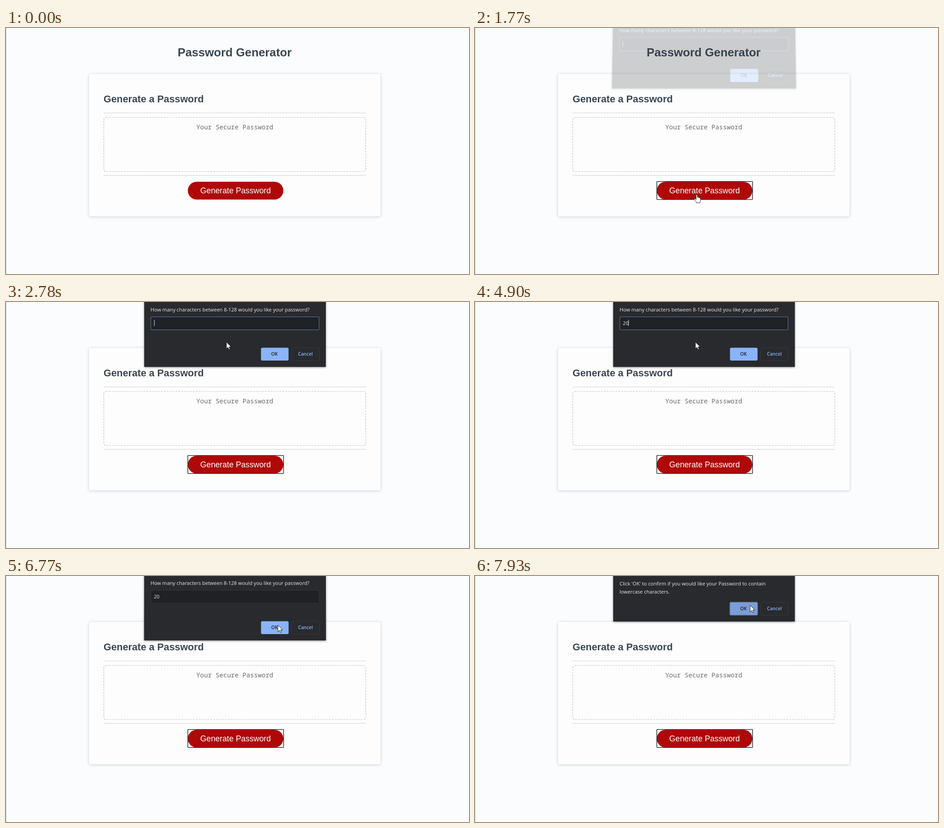
An HTML page for the animation above (8 s loop, 1025 by 546 pixels).

```html
<!DOCTYPE html>
<html lang="en">
<head>
<meta charset="utf-8">
<title>Password Generator</title>
<style>
html, body { margin: 0; width: 100%; height: 100%; overflow: hidden; background: #fafcfe; }
#stage { position: relative; width: 1025px; height: 546px; overflow: hidden; }
svg { position: absolute; left: 0; top: 0; overflow: visible; }
.card { position: absolute; left: 184px; top: 102px; width: 645px; height: 316px; border-radius: 4px;
  background: #fdfdfd; box-shadow: 0 1px 6px rgba(50, 65, 80, .24); }
.page { font-family: "Liberation Sans", Arial, sans-serif; }
.head { font-weight: 700; fill: #3b4752; }
.mono { font: 14.2px "Noto Sans Mono", monospace; fill: #6c6c6c; }
.dialog { position: absolute; left: 306px; top: -40px; width: 401.5px; background: #292a2d;
  box-shadow: 0 1px 4px rgba(0, 0, 0, .5); transform-origin: 201px 0; }
.dialog text { font: 11.08px "Open Sans", "Noto Sans", sans-serif; fill: #e8eaed; }
.dialog .btn { font-size: 10.2px; font-weight: 600; text-anchor: middle; fill: #8ab4f8; }
.dialog .dark { fill: #202124; }
#ask { height: 184px; }
#confirm { height: 141px; }
</style>
</head>
<body>
<div id="stage">
  <div class="card"></div>
  <svg class="page" width="1025" height="546">
    <path d="M.5 0V546" stroke="#cfd1d3"/>
    <text class="head" x="380" y="63" font-size="25.8">Password Generator</text>
    <text class="head" x="216" y="165" font-size="21.8">Generate a Password</text>
    <path d="M216 188.5H797M216 327H797" stroke="#e6e6e7" stroke-width="1.8"/>
    <rect x="216.5" y="198.5" width="580" height="120" rx="5" fill="none" stroke="#c2c2c2" stroke-width="1.2" stroke-dasharray="4 2.4"/>
    <text class="mono" x="506.5" y="225" text-anchor="middle">Your Secure Password</text>
    <rect x="402.5" y="341.3" width="211.5" height="39.4" rx="19.7" fill="#af0808"/>
    <text x="508.2" y="367.3" font-size="17.7" text-anchor="middle" fill="#fff">Generate Password</text>
    <rect id="ring" x="402.5" y="340.6" width="212" height="40" rx="1" fill="none" stroke="#101010" stroke-width="1.3"/>
  </svg>

  <div id="ask" class="dialog">
    <svg width="402" height="184" viewBox="306 -40 402 184">
      <text x="320" y="21.3">How many characters between 8-128 would you like your password?</text>
      <rect id="field" x="320.5" y="33" width="372.5" height="28.8" rx="2.5" fill="#202124"/>
      <text id="typed" x="327.3" y="51"></text>
      <rect id="caret" y="39.5" width="1" height="14" fill="#e8eaed"/>
      <rect id="askOk" x="564.5" y="101.5" width="61" height="28.5" rx="3"/>
      <text class="btn dark" x="594.3" y="119.4">OK</text>
      <rect x="632.5" y="101.5" width="61" height="28.5" rx="3" fill="none" stroke="#37383c"/>
      <text class="btn" x="662.8" y="119.4">Cancel</text>
    </svg>
  </div>

  <div id="confirm" class="dialog">
    <svg width="402" height="141" viewBox="306 -40 402 141">
      <text x="320" y="21.3">Click 'OK' to confirm if you would like your Password to contain</text>
      <text x="320" y="39.3">lowercase characters.</text>
      <rect id="confirmOk" x="564.3" y="58.3" width="61.2" height="28.6" rx="3" stroke="#5f7fb4" stroke-width="1.4"/>
      <text class="btn dark" x="594.3" y="76.4">OK</text>
      <rect x="632.5" y="58.5" width="61" height="28.5" rx="3" fill="none" stroke="#37383c"/>
      <text class="btn" x="662.8" y="76.4">Cancel</text>
    </svg>
  </div>

  <svg width="1025" height="546">
    <g id="cursor" fill="#fff" stroke="#111" stroke-width=".9" stroke-linejoin="round">
      <path id="arrow" d="M0 0V14.6L3.4 11.5L5.6 16.4L7.9 15.4L5.8 10.6H10.3Z"/>
      <path id="hand" d="M-1.5 1.2C-1.5-.7 1.3-.7 1.3 1.2V6C2.2 4.9 3.8 5.3 4 6.6C5 5.8 6.3 6.3 6.5 7.6C7.4 7 8.2 7.8 8.2 9V12.6C8.2 15 7.2 15.6 6.9 18H-.6C-.9 15.6-3.4 13.6-5.2 10.6C-6.2 8.8-4.2 7.8-2.9 9.4L-1.5 11Z"/>
      <path id="beam" d="M-3-7.5H-1L0-6.8L1-7.5H3M0-6.8V6.8M-3 7.5H-1L0 6.8L1 7.5H3" fill="none" stroke="#222"/>
    </g>
  </svg>
</div>
<script>
const LOOP = 8000, TICK = 76, BLINK = 550;
const CLICK = 1670, TYPE = 4820, SUBMIT = 6770, NEXT = SUBMIT + 2 * TICK;

const $ = id => document.getElementById(id);
const show = (id, on) => { $(id).style.visibility = on ? 'visible' : 'hidden'; };
const set = (id, attrs) => Object.entries(attrs).forEach(([k, v]) => $(id).setAttribute(k, v));
const clamp = (v, lo, hi) => Math.max(lo, Math.min(hi, v));
const ticks = ms => Math.floor(ms / TICK);

// Each move carries on from the last one; bow bends its path sideways
const moves = [
  { start: 100, end: 430, x: 709, y: 422, bow: 0 },
  { start: 570, end: 1050, x: 491, y: 370, bow: 0 },
  { start: 2160, end: 2700, x: 488, y: 89, bow: 48 },
  { start: 5980, end: 6690, x: 602, y: 109, bow: 0 },
  { start: 7700, end: 7930, x: 609, y: 65, bow: 0 }
];

function mouseAt(t) {
  let at = null, from = { x: 812, y: 488 };
  for (const m of moves) {
    if (t < m.start) break;
    const p = Math.min(1, (ticks(t - m.start) + 1) / (ticks(m.end - m.start) + 1));
    const e = p * p * (3 - 2 * p);
    at = {
      x: from.x + (m.x - from.x) * e + m.bow * Math.sin(Math.PI * e),
      y: from.y + (m.y - from.y) * e
    };
    from = m;
  }
  return at;
}

const inside = (m, x, y, w, h) => !!m && m.x >= x && m.x <= x + w && m.y >= y && m.y <= y + h;
const tint = over => over ? '#7b9dd8' : '#8ab4f8';

function drawMouse(mouse) {
  const hand = inside(mouse, 402, 341, 212, 40);
  const beam = inside(mouse, 216, 198, 581, 120);
  show('hand', hand);
  show('beam', beam);
  show('arrow', mouse && !hand && !beam);
  if (mouse) set('cursor', { transform: `translate(${mouse.x} ${mouse.y})` });
}

// The prompt tilts in over four ticks and leaves the same way at double speed
function drawPrompt(t, focused) {
  const step = focused ? ticks(t - CLICK) : 3 - 2 * ticks(t - SUBMIT);
  const away = (1 - clamp(step / 4, 0, 1)) ** 2;
  const { style } = $('ask');
  style.opacity = Math.min(1, 1.15 * (1 - away) ** 2);
  style.transform = away
    ? `translateY(${-21 * away}px) perspective(1000px) rotateX(${8 * away}deg)` : 'none';

  const typed = '20'.slice(0, clamp(ticks(t - TYPE) + 1, 0, 2));
  const since = t < TYPE ? t - CLICK - 10 : Math.max(0, t - TYPE - 60);
  const lit = focused && Math.floor(since / BLINK) % 2 === 0;
  $('typed').textContent = typed;
  set('caret', { x: 327.8 + typed.length * 5.8, opacity: lit ? 1 : 0 });
  set('field', { stroke: focused ? '#4c6084' : '#35363a', 'stroke-width': focused ? 1.5 : 1 });
}

function draw(t) {
  const mouse = mouseAt(t), focused = t < SUBMIT;
  drawMouse(mouse);
  drawPrompt(t, focused);
  show('ring', t >= CLICK);
  show('confirm', t >= NEXT);
  set('askOk', { fill: tint(focused && inside(mouse, 564, 101, 62, 29)) });
  set('confirmOk', { fill: tint(inside(mouse, 564, 58, 62, 29)) });
}

const began = performance.now();
function frame() {
  draw((performance.now() - began) % LOOP);
  requestAnimationFrame(frame);
}
frame();
</script>
</body>
</html>
```
